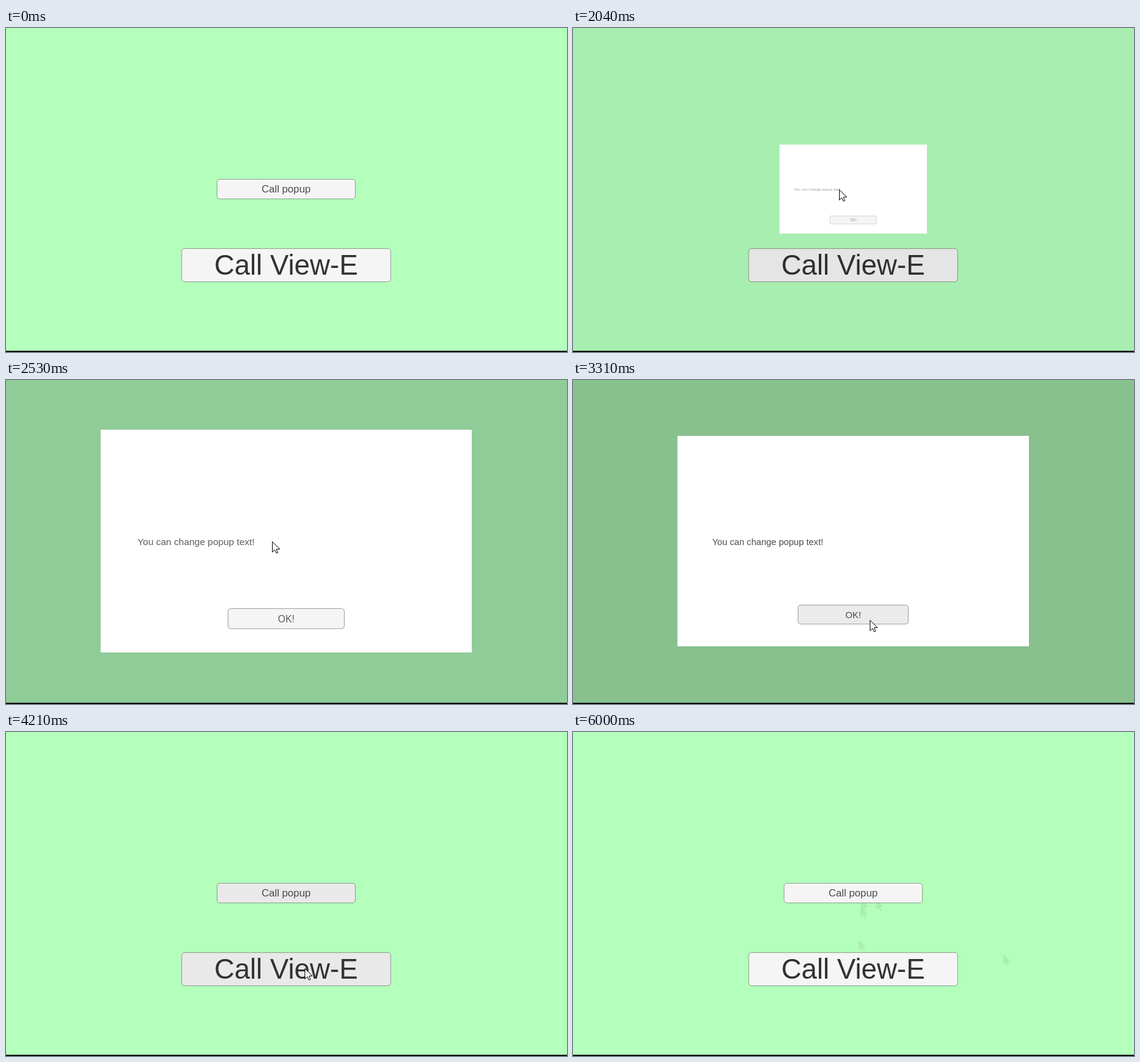
Write an HTML page with a canvas that moves like this. It is 913 by 528 pixels and loops after 6.42 s.

```html
<!DOCTYPE html>
<html lang="en">
<head>
<meta charset="utf-8">
<title>Popup demo</title>
<style>
html, body { margin: 0; width: 100%; height: 100%; overflow: hidden; background: #b4ffbc; }
canvas { display: block; }
</style>
</head>
<body>
<canvas id="stage" width="913" height="528"></canvas>
<script>
const ctx = document.getElementById('stage').getContext('2d');
const W = 913, H = 528, LOOP = 6420, STEP = 70;
const CX = 456, CY = 262.5, POPUP_W = 571, POPUP_H = 342.5;
const OPEN = 1888, OPEN_MS = 1470, CLOSE = 3622, CLOSE_MS = 400;
const ENTER = 610, LEAVE = 5330, GONE = 5800;

// Pointer moves: start, duration, destination; it rests in between.
const moves = [
  [ENTER, 440, 715, 268], [1050, 140, 727, 239], [1350, 140, 433, 263],
  [2600, 490, 483, 391], [3440, 150, 486, 385], [4800, 100, 462, 393],
  [LEAVE, 140, 468, 285], [5470, 70, 469, 273], [5540, 70, 493, 273],
  [5610, 70, 700, 362], [5680, 70, 895, 491]
];

const ramp = (t, start, ms = 80) => Math.max(0, Math.min(1, (t - start) / ms));
const pulse = (t, from, to) => ramp(t, from) - ramp(t, to);
const backIn = u => 2.70158 * u ** 3 - 1.70158 * u ** 2;

function pointerAt(t) {
  let x = 828, y = 477;
  for (const [start, ms, toX, toY] of moves) {
    const u = ramp(t, start, ms);
    x += (toX - x) * u;
    y += (toY - y) * u;
  }
  return [x, y];
}

function popupAt(t) {
  if (t < CLOSE) {
    const v = 1 - ramp(t, OPEN, OPEN_MS);
    return { scale: 1 - backIn(v), fade: 1 - v ** 3 };
  }
  const u = ramp(t, CLOSE, CLOSE_MS);
  return { scale: 1 - backIn(u), fade: 1 - u * u };
}

// Centres the line box, not the letters, on y.
function label(text, x, y, size, align, alpha) {
  ctx.font = `${size}px "Liberation Sans", Arial, sans-serif`;
  ctx.textAlign = align;
  ctx.fillStyle = `rgba(50,50,50,${alpha})`;
  ctx.fillText(text, x, y + size * .3465);
}

function button(x, y, w, h, shade) {
  ctx.beginPath();
  ctx.roundRect(x, y, w, h, 4.5);
  ctx.fillStyle = `rgb(${shade},${shade},${shade})`;
  ctx.fill();
  ctx.lineWidth = 1;
  ctx.strokeStyle = 'rgba(60,60,60,.48)';
  ctx.stroke();
}

function arrow(x, y, fill) {
  const outline = [[0, 0], [0, 17], [4, 13.3], [6.6, 18.8], [9, 17.8], [6.6, 12.3], [12, 12]];
  ctx.beginPath();
  for (const [dx, dy] of outline) ctx.lineTo(x + dx, y + dy);
  ctx.closePath();
  ctx.fillStyle = fill;
  ctx.fill();
}

function drawPopup(t, scale, fade) {
  const left = Math.round(CX - POPUP_W / 2 * scale);
  const top = Math.round(CY - POPUP_H / 2 * scale);
  ctx.fillStyle = '#fff';
  ctx.fillRect(left, top, 2 * (CX - left), 2 * (CY - top));

  ctx.save();
  ctx.translate(CX, CY);
  ctx.scale(scale, scale);
  const ink = .88 * Math.sqrt(fade);
  const shade = 245 - 10 * ramp(t, 3090) - 20 * pulse(t, CLOSE - 80, CLOSE);
  label('You can change popup text!', -229, 1, 14.6, 'left', ink);
  button(-89.5, 104, 179, 31, shade);
  label('OK!', 0, 120, 14.9, 'center', ink);
  ctx.restore();
}

function draw(t) {
  ctx.fillStyle = '#b4ffbc';
  ctx.fillRect(0, 0, W, H);

  // Faint marks stay where the pointer was on its way out.
  for (let at = LEAVE + STEP; at < Math.min(t, LEAVE + 6 * STEP); at += STEP) {
    arrow(...pointerAt(at), 'rgba(125,125,135,.15)');
  }

  const dim = 1 - .05 * pulse(t, 2300, 4560);
  const popupHover = pulse(t, 1420, OPEN) + pulse(t, 5430, 5640);
  const popupPress = pulse(t, 1760, OPEN);
  const viewHover = pulse(t, 4560, 5370);
  button(343.5, 246.5, 225, 32, (245 - 10 * popupHover - 35 * popupPress) * dim);
  label('Call popup', 455.8, 262.5, 16.7, 'center', .88);
  button(286, 359.5, 340, 54, (245 - 10 * viewHover) * dim);
  label('Call View-E', 455.8, 386.6, 45.4, 'center', 1);

  const { scale, fade } = popupAt(t);
  ctx.fillStyle = `rgba(0,0,0,${.245 * fade})`;
  ctx.fillRect(0, 0, W, H);
  ctx.fillStyle = '#000';
  ctx.fillRect(0, H - 2, W, 2);
  if (scale > 0) drawPopup(t, scale, fade);

  if (t >= ENTER && t < GONE) {
    const [x, y] = pointerAt(t);
    arrow(x + .5, y + .5, '#fff');
    ctx.strokeStyle = '#000';
    ctx.stroke();
  }
}

function frame() {
  const t = performance.now() % LOOP;
  draw(Math.floor((t - 10) / STEP) * STEP + 10);
  requestAnimationFrame(frame);
}
frame();
</script>
</body>
</html>
```
